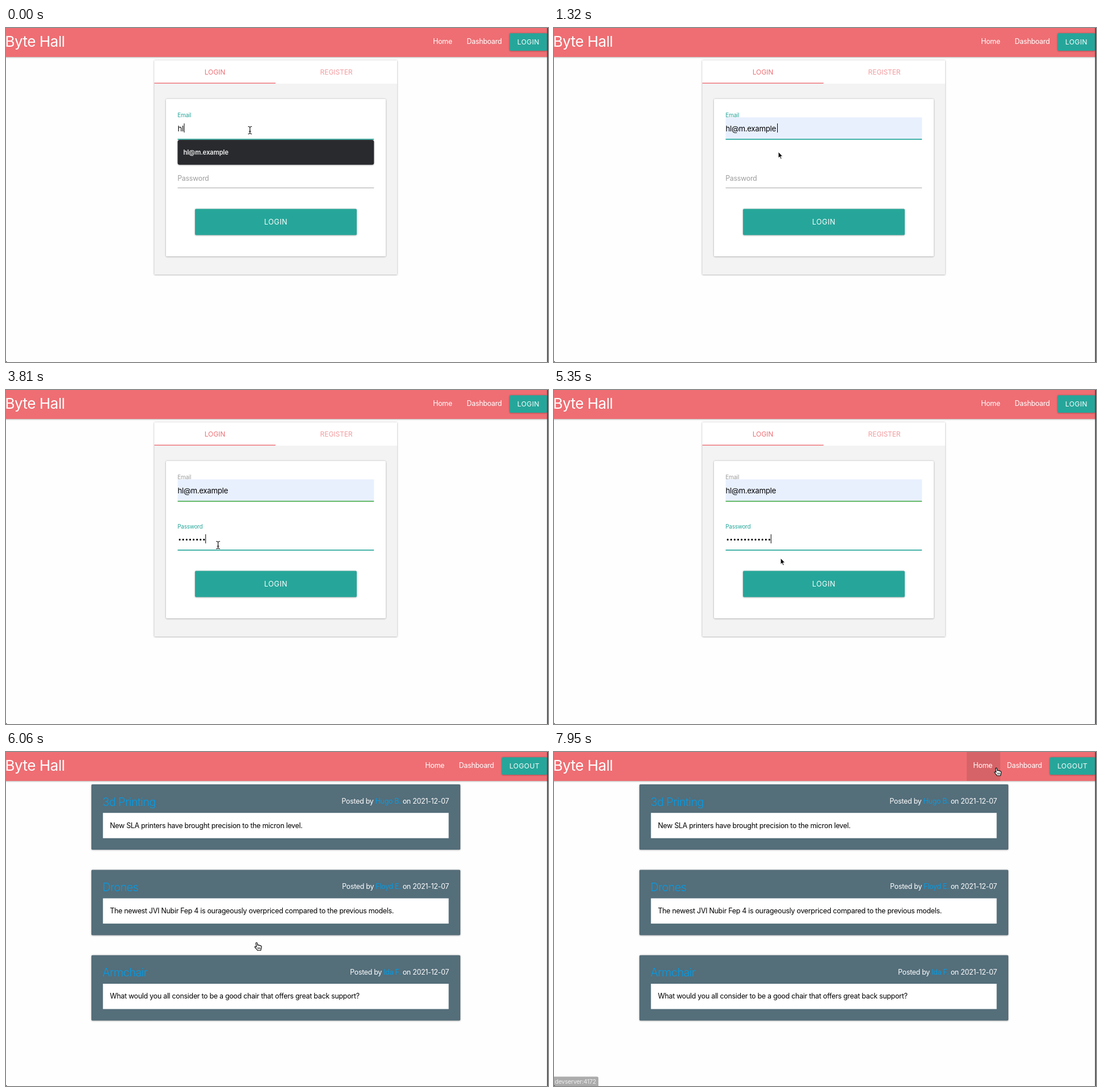
Recreate the animation shown at these times as an HTML page. Size 952 px wide and 588 px high, loop 8 s.

```html
<!DOCTYPE html>
<html lang="en">
<head>
<meta charset="utf-8">
<title>Login demo</title>
<style>
html, body { margin: 0; width: 100%; height: 100%; overflow: hidden; background: #fefefe; }
svg { display: block; width: 952px; height: 588px; }
text { font: 400 12.4px Inter, sans-serif; font-optical-sizing: none; letter-spacing: -.27px; white-space: pre; }
.mid { text-anchor: middle; }
.end { text-anchor: end; }
.white { fill: #fff; }
.teal { fill: #26a69a; }
.link { fill: #039be5; }
.brand { font-size: 26px; letter-spacing: -.5px; }
.tab { font-size: 11.9px; letter-spacing: 0; fill: #ee6e73; }
.btn { font-size: 12px; letter-spacing: .45px; }
.big { font-size: 12.5px; letter-spacing: .5px; }
.input { font-size: 13.2px; }
.preview { font: 11.4px "Liberation Sans", Arial, sans-serif; letter-spacing: 0; }
.option { font-size: 11.2px; font-weight: 600; letter-spacing: -.1px; fill: #f1f1f1; }
.heading { font-size: 20px; font-weight: 300; letter-spacing: -.65px; }
.status { font-size: 10.4px; letter-spacing: -.2px; fill: #eee; }
.raised { filter: drop-shadow(0 1.5px 1px rgba(0,0,0,.16)) drop-shadow(0 .8px 1.6px rgba(0,0,0,.22)); }
.raised.hovered { filter: drop-shadow(0 2.4px 1.6px rgba(0,0,0,.2)) drop-shadow(0 1px 3px rgba(0,0,0,.24)); }
</style>
</head>
<body>
<svg viewBox="0 0 952 588">
  <defs>
    <clipPath id="buttonClip"><rect x="332" y="318.5" width="284" height="46" rx="1.7"/></clipPath>
  </defs>
  <rect width="952" height="588" fill="#fefefe"/>

  <rect class="raised" x="-5" y="-5" width="962" height="56" fill="#ee6e73"/>
  <rect id="homeHover" x="725" width="58.7" height="51"/>
  <text class="brand white" x="-1.5" y="33">Byte Hall</text>
  <g id="navLinks">
    <text class="white" x="750" y="28">Home</text>
    <text class="white" x="809.3" y="28">Dashboard</text>
  </g>
  <rect id="navButton" class="raised teal" y="9.3" height="30.7" rx="1.7"/>
  <text id="navLabel" class="btn mid white" y="29"></text>

  <g id="login">
    <rect class="raised" x="260.5" y="57" width="426.5" height="377" fill="#f3f3f3"/>
    <rect x="260.5" y="57" width="426.5" height="41" fill="#fff"/>
    <rect x="260.5" y="96.3" width="213" height="1.7" fill="#ef8589"/>
    <text class="tab mid" x="367" y="82">LOGIN</text>
    <text class="tab mid" x="580.3" y="82" opacity=".7">REGISTER</text>
    <rect class="raised" x="281" y="125" width="386" height="277" rx="1.7" fill="#fff"/>

    <rect id="autofill" x="301.5" y="157.3" width="344.8" height="38" fill="#e8f0fe"/>
    <text id="emailLabel">Email</text>
    <text id="email" x="301.5" y="181.5"></text>
    <rect id="emailLine" x="301.5" y="195" width="344.8" height="1.7"/>

    <text id="passLabel">Password</text>
    <line id="dots" x1="305.1" y1="263.4" y2="263.4" stroke="#000" stroke-width="3.1" stroke-linecap="round" stroke-dasharray="0 6.1"/>
    <rect id="passLine" x="301.5" y="281" width="344.8"/>
    <rect id="caret" width="1" height="16"/>

    <rect id="button" class="raised" x="332" y="318.5" width="284" height="46" rx="1.7"/>
    <g clip-path="url(#buttonClip)"><circle id="ripple" cx="443" cy="336" fill="#fff" opacity=".2"/></g>
    <text class="big mid white" x="474" y="346.3">LOGIN</text>

    <g id="menu">
      <rect class="raised" x="301.5" y="197" width="344.8" height="43.7" rx="3.5" fill="#292a2e"/>
      <rect id="optionHover" x="301.5" y="203.3" width="344.8" height="31" fill="#414244"/>
      <text class="option" x="311.5" y="223">hl@m.example</text>
    </g>
  </g>

  <g id="posts"></g>

  <g id="status">
    <path d="M0 571.5H75.5Q78 571.5 78 574V588H0Z" fill="#acacac"/>
    <text class="status" x="1.5" y="583.8">devserver:4172</text>
  </g>
  <rect x="950.4" width="1.6" height="588" fill="#39434e"/>
  <path d="M0 586V588H2Z" fill="#444"/>

  <g id="beam" fill="none" stroke-linecap="round">
    <path d="M-3-6.5Q-.3-6.5 0-5Q.3-6.5 3-6.5M0-5V5M-3 6.5Q-.3 6.5 0 5Q.3 6.5 3 6.5M-1.5 2H1.5" stroke="#fff" stroke-width="2.4" opacity=".7"/>
    <path d="M-3-6.5Q-.3-6.5 0-5Q.3-6.5 3-6.5M0-5V5M-3 6.5Q-.3 6.5 0 5Q.3 6.5 3 6.5M-1.5 2H1.5" stroke="#000" stroke-width="1.1"/>
  </g>
  <path id="arrow" d="M0 0V11L2.5 8.7L4.2 12.7L6 11.9L4.3 8H7.7Z" stroke="#fff" stroke-width="1"/>
  <g id="hand" stroke="#000" stroke-linecap="round" stroke-linejoin="round">
    <path d="M-1.5 1C-1.5-.6 1-.6 1 1L1.6 4.6C2 3.6 4 3.6 4.2 5C4.8 4.2 6.4 4.4 6.5 5.8C7.2 5.2 8.5 5.6 8.5 7C8.6 9.5 7.6 11 7.3 13.5H1.2C.6 11.5-1.4 10.3-3 8.2C-4 6.8-2.3 6-1.2 7L-.3 7.6Z" fill="#fff" stroke-width="1.1"/>
    <path d="M2.2 8.5V11M4.1 8.5V11M6 8.5V11" stroke-width=".8"/>
  </g>
</svg>

<script>
const $ = id => document.getElementById(id);
const set = (id, attrs) => {
  for (const [name, value] of Object.entries(attrs)) $(id).setAttribute(name, value);
};
const show = (id, on) => { $(id).style.display = on ? "" : "none"; };

const LOOP = 8000, TEAL = "#26a69a", GREEN = "#4caf50", GRAY = "#9e9e9e";
const EMAIL = "hl@m.example";
const DOT_STEP = 6.1;

const posts = [
  ["3d Printing", "Hugo B.", "New SLA printers have brought precision to the micron level."],
  ["Drones", "Floyd E.", "The newest JVI Nubir Fep 4 is ourageously overpriced compared to the previous models."],
  ["Armchair", "Ida F.", "What would you all consider to be a good chair that offers great back support?"]
];
$("posts").innerHTML = posts.map(([title, author, body], i) => `
  <g transform="translate(0 ${i * 150.4})">
    <rect class="raised" x="150" y="57" width="648" height="115" rx="1.7" fill="#546e7a"/>
    <text class="heading link" x="169.5" y="94.5">${title}</text>
    <text class="end white" x="778" y="91">Posted by <tspan class="link">${author}</tspan> on 2021-12-07</text>
    <rect x="170.3" y="107.2" width="607.2" height="44.5" fill="#fff"/>
    <text x="182.5" y="133.5">${body}</text>
  </g>`).join("");

const typed = n => ({ dots: n, caret: [301.4 + n * DOT_STEP, 254] });

// Each step changes only the listed parts of the state.
const steps = [
  [0, { cursor: ["beam", 428.5, 180], email: "hl", caret: [312.5, 168], menu: 1, hover: 0, preview: 0,
        emailInk: 1, emailLine: TEAL, passLift: 0, passInk: 0, passLine: GRAY, dots: 0,
        buttonHover: 0, ripple: 0, loggedIn: 0, homeShade: 0, status: 0 }],
  [480, { caret: null }],
  [840, { cursor: ["arrow", 412, 207], email: EMAIL, preview: 1, hover: 1 }],
  [960, { cursor: ["arrow", 396, 216] }],
  [1080, { cursor: ["arrow", 394, 218] }],
  [1320, { menu: 0, preview: 0, caret: [392, 168] }],
  [1440, { cursor: ["arrow", 394, 226] }],
  [1560, { cursor: ["arrow", 390, 245] }],
  [1680, { cursor: ["beam", 384, 280] }],
  [1790, { cursor: ["beam", 378, 298] }],
  [1910, { cursor: ["beam", 374, 284] }],
  [2030, { cursor: ["beam", 372.5, 273], caret: [301.4, 254], emailInk: 0, emailLine: GREEN }],
  [2150, { passLift: .25, passInk: .45 }],
  [2270, { passLift: .85, passInk: .85, passLine: TEAL }],
  [2380, { passLift: 1, passInk: 1 }],
  [2620, { caret: null }],
  [2730, typed(1)],
  [2970, typed(2)],
  [3210, typed(3)],
  [3330, typed(4)],
  [3450, typed(5)],
  [3570, typed(6)],
  [3690, typed(7)],
  [3810, typed(8)],
  [4290, { caret: null }],
  [4410, typed(9)],
  [4650, typed(10)],
  [4770, typed(11)],
  [4880, typed(12)],
  [5120, typed(13)],
  [5350, { cursor: ["arrow", 398, 296] }],
  [5470, { cursor: ["hand", 432, 331], buttonHover: 1 }],
  [5580, { cursor: ["hand", 440.3, 335.7] }],
  [5820, { caret: null, passInk: .9, passLine: GREEN, ripple: 55 }],
  [5940, { passInk: .5, ripple: 124.5 }],
  [6060, { loggedIn: 1 }],
  [6540, { cursor: ["arrow", 444, 262] }],
  [6650, { cursor: ["arrow", 445.5, 197] }],
  [6890, { cursor: ["beam", 330, 136] }],
  [7000, { cursor: ["beam", 280, 114.5] }],
  [7360, { cursor: ["arrow", 480, 84] }],
  [7480, { cursor: ["arrow", 694, 46] }],
  [7710, { cursor: ["hand", 752, 34], homeShade: .03 }],
  [7830, { cursor: ["hand", 779, 29], homeShade: .07 }],
  [7950, { cursor: ["hand", 777, 28.3], homeShade: .1, status: 1 }]
];

const stateAt = time => Object.assign({}, ...steps.filter(([at]) => at <= time).map(step => step[1]));

function placeLabel(id, baseline, lift, ink) {
  set(id, {
    transform: `translate(301.2 ${baseline - 25 * lift}) scale(${1 - .2 * lift})`,
    style: `fill: color-mix(in srgb, ${TEAL} ${ink * 100}%, ${GRAY})`
  });
}

function draw(time) {
  const s = stateAt(time);
  show("login", !s.loggedIn);
  show("posts", s.loggedIn);
  show("status", s.status);

  set("homeHover", { opacity: s.homeShade });
  set("navLinks", { transform: `translate(${s.loggedIn ? -13.7 : 0} 0)` });
  const left = s.loggedIn ? 871 : 884.7;
  set("navButton", { x: left, width: 950.4 - left });
  set("navLabel", { x: (left + 950.4) / 2 });
  $("navLabel").textContent = s.loggedIn ? "LOGOUT" : "LOGIN";

  show("autofill", s.email === EMAIL);
  show("menu", s.menu);
  show("optionHover", s.hover);
  set("email", { class: s.preview ? "preview" : "input" });
  $("email").textContent = s.email;
  set("emailLine", { fill: s.emailLine });
  set("passLine", { fill: s.passLine, height: s.passLine === GRAY ? .9 : 1.7 });
  placeLabel("emailLabel", 182, 1, s.emailInk);
  placeLabel("passLabel", 268.5, s.passLift, s.passInk);

  show("dots", s.dots);
  set("dots", { x2: 305.2 + DOT_STEP * (s.dots - 1) });
  show("caret", s.caret);
  if (s.caret) set("caret", { x: s.caret[0], y: s.caret[1] });

  set("button", { fill: s.buttonHover ? "#2bbbad" : TEAL, class: s.buttonHover ? "raised hovered" : "raised" });
  set("ripple", { r: s.ripple });

  const [kind, x, y] = s.cursor;
  for (const id of ["beam", "arrow", "hand"]) show(id, id === kind);
  set(kind, { transform: `translate(${x} ${y})` });
}

const start = performance.now();
function tick() {
  draw((performance.now() - start) % LOOP);
  requestAnimationFrame(tick);
}
tick();
</script>
</body>
</html>
```
